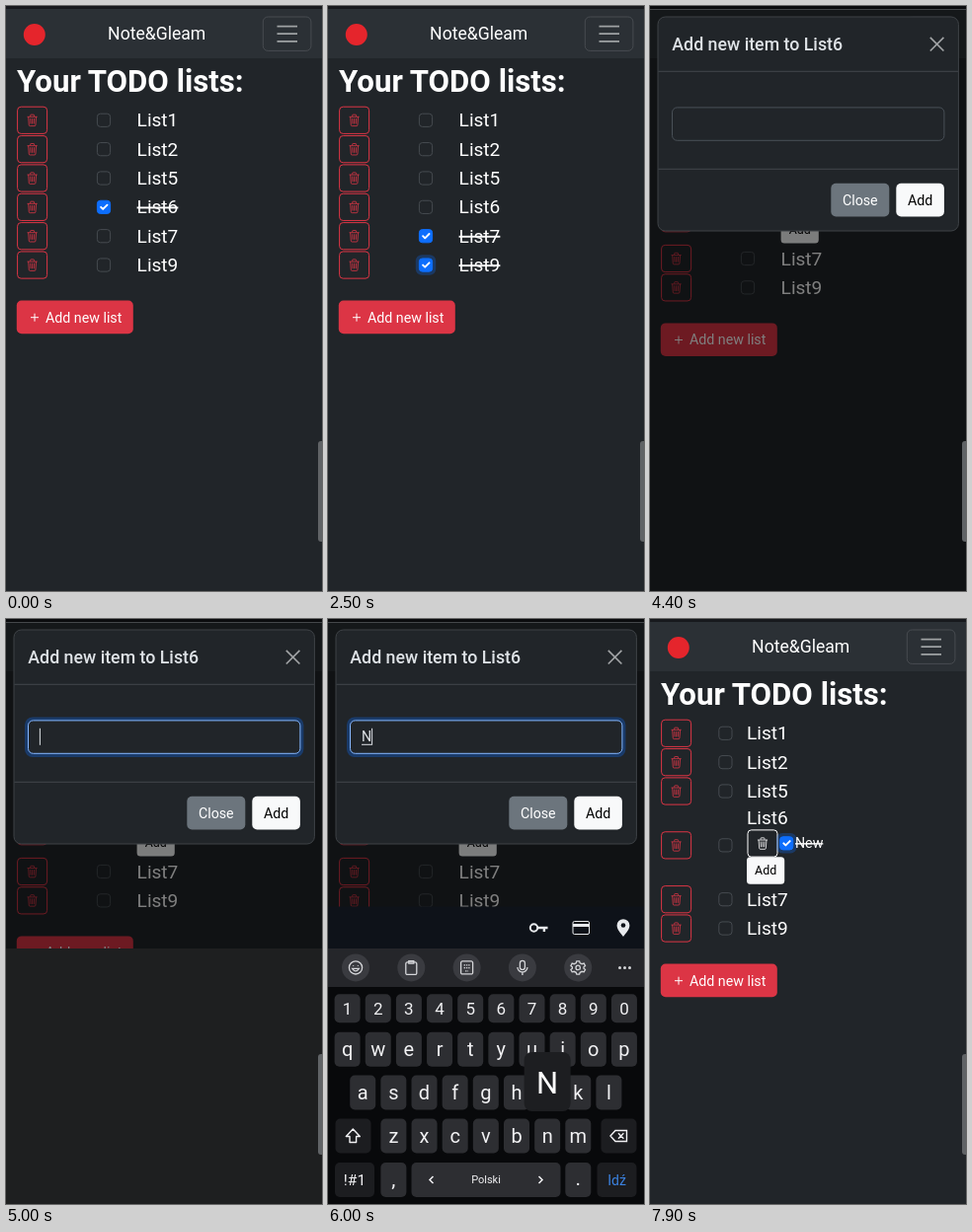
These frames come from a looping animation (320x593 px, 8 s). An HTML page:

```html
<!DOCTYPE html>
<html lang="en">
<head>
<meta charset="utf-8">
<title>TODO lists</title>
<style>
  html, body { margin: 0; width: 100%; height: 100%; overflow: hidden; background: #212529; }
  svg { display: block; width: 100%; height: 100%; font-family: Roboto, Arial, sans-serif; }
  text { white-space: pre; }
</style>
</head>
<body>
<svg id="stage" viewBox="0 0 320 593"></svg>
<script>
const LOOP = 8000;
const RED = '#dc3545', BLUE = '#0d6efd', PAGE = '#212529', LIGHT = '#f8f9fa';
const ROW_TOP = 115.8, ROW_STEP = 29.35;
const LISTS = ['List1', 'List2', 'List5', 'List6', 'List7', 'List9'];
const OPEN_ROW = 3;

// Event times in ms
const T = {
  uncheck6: 900, check7: 1500, check9: 2200, uncheck9: 2800, uncheck7: 3100, expand: 3420,
  modalIn: 4100, focus: 4600, panel: 4800, keyboard: 5150, autofill: 5250,
  keyboardOut: 6700, press: 6900, modalOut: 7060, handle: 7150, added: 7340, checkNew: 7700
};
const TYPED = [['N', 5900], ['e', 6200], ['w', 6430]];
const POPUP_MS = 160;

const during = (t, a, b) => t >= a && t < b;
const progress = (t, start, length) => Math.max(0, Math.min(1, (t - start) / length));
const ease = p => 1 - (1 - p) ** 2.4;

const rect = (x, y, w, h, r, fill, extra = '') =>
  `<rect x="${x}" y="${y}" width="${w}" height="${h}" rx="${r}" fill="${fill}" ${extra}/>`;
const frame = (x, y, w, h, r, color, fill = 'none') =>
  rect(x, y, w, h, r, fill, `stroke="${color}"`);
const text = (s, x, y, size, extra = '', fill = '#fff') =>
  `<text x="${x}" y="${y}" font-size="${size}" fill="${fill}" ${extra}>${s}</text>`;
const centered = (s, x, y, size, fill = '#fff', extra = '') =>
  text(s, x, y, size, `text-anchor="middle" ${extra}`, fill);
const line = (d, color, width = 1, extra = '') =>
  `<path d="${d}" fill="none" stroke="${color}" stroke-width="${width}" ${extra}/>`;
const group = (content, attrs) => `<g ${attrs}>${content}</g>`;
const at = (x, y, content) => group(content, `transform="translate(${x} ${y})"`);
const strike = on => on ? 'text-decoration="line-through"' : '';

function trashButton(x, y, color) {
  const icon = line('M1.5 3.5H14.5M5.5 3V1.5q0-.8.8-.8h3.4q.8 0 .8.8V3' +
    'M2.9 3.5 3.7 14.2q.1 1.3 1.3 1.3h6q1.2 0 1.3-1.3L13.1 3.5' +
    'M5.5 5.5l.4 7.2M8 5.5v7.2M10.5 5.5l-.4 7.2', color, 1.05);
  return frame(x - 15, y - 13.6, 30, 27.2, 3.6, color) +
    group(icon, `transform="translate(${x - 6.2} ${y - 6.2}) scale(.775)"`);
}

function checkbox(x, y, on, focused) {
  const ring = focused ? rect(x - 10.2, y - 10.2, 20.4, 20.4, 6, BLUE, 'opacity=".28"') : '';
  const border = on ? BLUE : focused ? '#86b7fe' : '#464b50';
  const tick = on ? line(`M${x - 2.9} ${y}l2.1 2.1 4.3-4.3`, '#fff', 1.9,
    'stroke-linecap="round" stroke-linejoin="round"') : '';
  return ring + frame(x - 6.6, y - 6.6, 13.2, 13.2, 3.2, border, on ? BLUE : PAGE) + tick;
}

function navbar() {
  return rect(0, 0, 320, 53, 0, '#2b3035') + rect(0, 0, 320, 3, 0, '#17191d') +
    '<circle cx="28.8" cy="29" r="11" fill="#e5252c"/>' +
    centered('Note&amp;Gleam', 152.7, 34, 17.6) +
    frame(260.3, 11, 48.6, 34.4, 5, '#484c51') +
    line('M274.5 20.6h20.5M274.5 28.2h20.5M274.5 35.9h20.5', '#9fa2a4', 1.7);
}

function page(t) {
  const added = t >= T.added;
  const open = ease(progress(t, T.expand, 350));
  const shift = added ? 51 : 22.8 * open;
  const checkX = added ? 76.4 : 99;
  const textX = added ? 98 : 132.6;
  const checked = {
    List6: t < T.uncheck6,
    List7: during(t, T.check7, T.uncheck7),
    List9: during(t, T.check9, T.uncheck9)
  };
  const focused = t >= T.expand ? '' : t >= T.uncheck7 ? 'List7' : t >= T.check9 ? 'List9' :
    t >= T.check7 ? 'List7' : t >= T.uncheck6 ? 'List6' : '';

  const rows = LISTS.map((name, i) => {
    const offset = i < OPEN_ROW ? 0 : i === OPEN_ROW ? shift / 2 : shift;
    const y = ROW_TOP + ROW_STEP * i;
    const base = i === OPEN_ROW ? y + 6.6 - 2.2 * open : y + offset + 6.6;
    return trashButton(26.6, y + offset, RED) +
      checkbox(checkX, y + offset, checked[name], focused === name) +
      text(name, textX, base, 19.1, strike(checked[name]));
  }).join('');

  let details = '';
  if (added) {
    const done = t >= T.checkNew;
    details = trashButton(114, 227.5, '#fff') + checkbox(138.2, 227.3, done, done) +
      text('New', 147, 232.2, 14.2, strike(done));
  }
  if (open > 0) {
    const y = added ? 241.2 : 213;
    details += `<clipPath id="fold"><rect x="90" y="212" width="120" height="${added ? 60 : 30 * open}"/></clipPath>` +
      group(rect(textX, y, 38.2, 27.6, 3.6, LIGHT) +
        centered('Add', textX + 19.1, y + 18.1, 12.4, '#000'), 'clip-path="url(#fold)"');
  }

  const addList = at(0, shift, rect(10.8, 298.6, 118, 33.6, 5, RED) +
    line('M25 315.7h8M29 311.7v8', '#fff', 1) + text('Add new list', 40, 320.6, 14.22));

  return rect(0, 0, 320, 593, 0, PAGE) + navbar() +
    text('Your TODO lists:', 11, 87.3, 31.2, 'font-weight="700"') + rows + details + addList;
}

function input(t) {
  const focused = during(t, T.focus, T.keyboardOut);
  const typed = TYPED.filter(([, time]) => t >= time).map(([c]) => c).join('');
  const widths = [0, 10.2, 17.7, 28.4];
  const end = 34 + widths[typed.length];
  return (focused ? rect(19, 99.4, 282.4, 40.6, 8, BLUE, 'opacity=".3"') : '') +
    frame(22.5, 102.9, 275.4, 33.4, 5, focused ? '#86b7fe' : '#495057', PAGE) +
    text(typed, 34, 124.3, 14.22, '', '#dee2e6') +
    (focused && typed ? line(`M34 127.3H${end}`, '#dee2e6') : '') +
    (focused ? line(`M${end + .4} 110.8v17`, '#dee2e6') : '');
}

function modal(t) {
  const shown = ease(progress(t, T.modalIn, 300)) * (1 - progress(t, T.modalOut, 200));
  const backdrop = progress(t, T.modalIn, 150) * (1 - progress(t, T.modalOut + 100, 160));
  if (backdrop <= 0) return '';
  const pressed = during(t, T.press, T.modalOut + 300);
  const box = frame(8, 11, 304.4, 217, 7.5, '#3f4347', PAGE) +
    line('M8.5 66.3H312M8.5 165.3H312', '#41464b') +
    text('Add new item to List6', 22.3, 44.6, 17.78, 'font-weight="500"', '#dee2e6') +
    line('M283.8 31.9l13.6 13.6m0-13.6l-13.6 13.6', '#a0a2a4', 1.7) + input(t) +
    rect(183.3, 179.8, 59, 33.6, 5, '#6c757d') + centered('Close', 212.8, 201.6, 14.22) +
    rect(249.3, 179.8, 48.6, 33.6, 5, pressed ? '#c6c7c8' : LIGHT) +
    centered('Add', 273.6, 201.6, 14.22, '#000');
  return rect(0, 0, 320, 593, 0, '#000', `opacity="${backdrop / 2}"`) +
    rect(0, 3, 320, 1, 0, '#45474a', `opacity="${backdrop}"`) +
    group(box, `opacity="${shown}" transform="translate(0 ${(shown - 1) * 44})"`);
}

const KEY_ROWS = [
  { keys: '1234567890', x: 19.6, y: 394.8, h: 29, size: 17 },
  { keys: 'qwertyuiop', x: 19.6, y: 436.2, h: 35, size: 20 },
  { keys: 'asdfghjkl', x: 35.2, y: 480, h: 35, size: 20 },
  { keys: 'zxcvbnm', x: 66.4, y: 524, h: 35, size: 20 }
];
const KEY_STEP = 31.15;

const keyCap = (x, y, w, h, fill = '#2d2e32') => rect(x - w / 2, y - h / 2, w, h, 5, fill);

function toolbar() {
  const ink = '#d5d6d9';
  const icons = [
    '<circle r="6.6"/><path d="M-3.4 1q3.4 5 6.8 0zM-2.4-2.2v.8M2.4-2.2v.8"/>',
    '<rect x="-5.5" y="-5.5" width="11" height="12.5" rx="1.5"/><path d="M-2.5-6.8h5v2.6h-5z"/>',
    '<rect x="-6" y="-6.5" width="12" height="13" rx="1.5"/><path d="M-3-2.5H3M-3 .2H3M-1.5 3.4h3" stroke-dasharray="1.4 .9"/>',
    '<rect x="-2.5" y="-7" width="5" height="9" rx="2.5"/><path d="M-5-.5a5 5 0 0 0 10 0M0 4.5V7.5"/>',
    '<circle r="2.2"/><path d="M-1.4-6.6h2.8l.6 2 2 .9 2-.6 1.3 2.4L5.8-.6v1.4L7.3 2 6 4.4l-2-.5-2 1-.6 1.9h-2.8L-2 4.900-4 3.900-6 4.400-7.300 2-5.800.8v-1.400L-7.300-1.900-6-4.300-4-3.700-2-4.600z"/>'
  ];
  return rect(0, 334, 320, 39, 0, '#25262a') + icons.map((icon, i) =>
    at(28 + 56.3 * i, 353.4, '<circle r="14" fill="#3a3b40"/>' +
      group(icon, `fill="none" stroke="${ink}" stroke-width="1.3"`))).join('') +
    [-5, 0, 5].map(d => `<circle cx="${300.5 + d}" cy="353.4" r="1.5" fill="${ink}"/>`).join('');
}

function autofillBar() {
  const ink = '#e8eaed';
  return rect(0, 291.5, 320, 43, 0, '#0e1219') +
    `<circle cx="208.500" cy="313" r="3.700" fill="none" stroke="${ink}" stroke-width="2"/>` +
    line('M212.5 313H222.500M218.900 313v4', ink, 2.4) +
    frame(248, 306.5, 16.5, 13, 1.5, ink) + rect(248, 309, 16.5, 3, 0, ink) +
    `<path d="M299 322c-3-4-6.400-7.200-6.400-11.400a6.400 6.400 0 0 1 12.800 0c0 4.200-3.400 7.400-6.400 11.400z" fill="${ink}"/>` +
    '<circle cx="299" cy="310.500" r="2.300" fill="#0e1219"/>';
}

function keyboard(t) {
  const upper = t < TYPED[0][1];
  const ink = '#f1f1f3';
  const letters = KEY_ROWS.map(({ keys, x, y, h, size }) => [...keys].map((c, i) => {
    const cx = x + KEY_STEP * i;
    return keyCap(cx, y, 26, h) +
      centered(upper ? c.toUpperCase() : c, cx, y + size * .34, size, ink);
  }).join('')).join('');

  const special = keyCap(25.5, 524, 36, 35, '#1c1d20') + keyCap(294.5, 524, 36, 35, '#1c1d20') +
    line('M25.300 517l7 7.500h-3.700v6h-6.600v-6h-3.700z', ink, 1.4, `stroke-linejoin="round" ${upper ? 'style="fill:#f1f1f3"' : ''}`) +
    line('M286 524l5-5.500h11.500v11h-11.500zM294 521.300l5.400 5.400m0-5.400l-5.400 5.400', ink, 1.4) +
    keyCap(27, 568.5, 40, 35, '#1c1d20') + centered('!#1', 27, 574, 15.5, ink) +
    keyCap(66.4, 568.5, 26, 35) + centered(',', 66.4, 575, 21, ink) +
    keyCap(160, 568.5, 151, 35) + centered('Polski', 160, 572, 11, ink) +
    line('M106.500 565l-3.500 3.500 3.500 3.500M213.500 565l3.500 3.500-3.500 3.500', ink, 1.5) +
    keyCap(253.3, 568.5, 26, 35) + centered('.', 253.3, 574, 21, ink) +
    keyCap(292.500, 568.5, 40, 35, '#1c1d20') + centered('Idź', 292.500, 573.500, 14, '#3b82e0');

  return rect(0, 334, 320, 259, 0, '#08090b') + toolbar() + letters + special + keyPopup(t);
}

function keyPopup(t) {
  const hit = TYPED.find(([, time]) => during(t, time - 60, time + POPUP_MS));
  if (!hit) return '';
  const key = hit[0].toLowerCase();
  const row = KEY_ROWS.find(r => r.keys.includes(key));
  const x = row.x + KEY_STEP * row.keys.indexOf(key), y = row.y - 55;
  return rect(x - 23.500, y - 30, 47, 60, 8, '#1d1e21') + centered(hit[0], x, y + 12, 31);
}

function scene(t) {
  const panel = during(t, T.panel, T.keyboardOut);
  const keys = during(t, T.keyboard, T.keyboardOut);
  const handle = t < T.keyboard || t >= T.handle;
  return page(t) + modal(t) +
    (panel ? rect(0, 334, 320, 259, 0, '#1e1f20') : '') +
    (keys && t >= T.autofill ? autofillBar() : '') +
    (keys ? keyboard(t) : '') +
    (handle ? rect(316, 441, 8, 102, 3, '#606366') : '');
}

const stage = document.getElementById('stage');
const start = performance.now();
let last = '';
function tick() {
  const markup = scene((performance.now() - start) % LOOP);
  if (markup !== last) stage.innerHTML = last = markup;
  requestAnimationFrame(tick);
}
tick();
</script>
</body>
</html>
```
